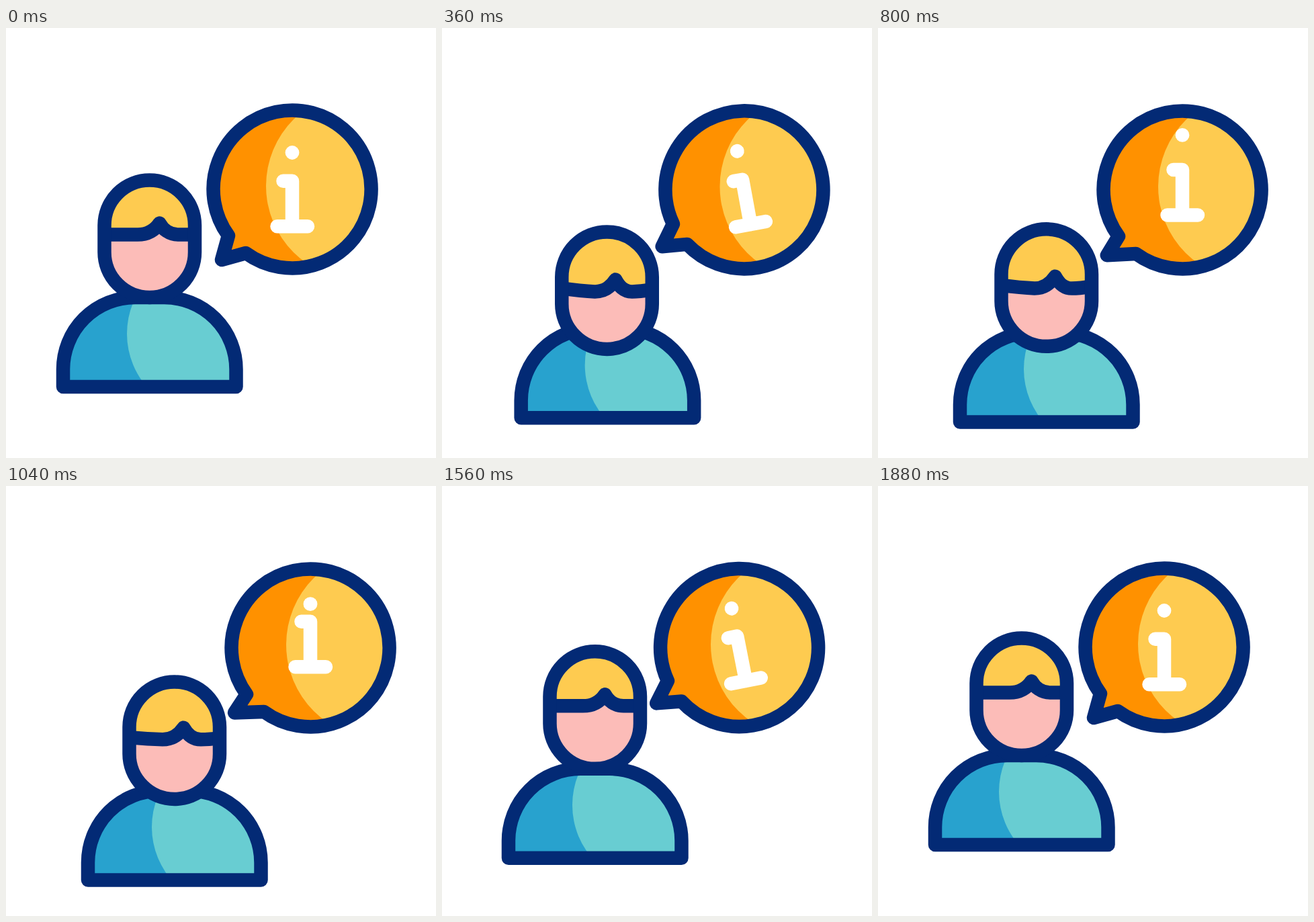
These frames come from a looping animation (640 by 640 pixels, 2 s). An HTML page:

```html
<!DOCTYPE html>
<html lang="en">
<head>
<meta charset="utf-8">
<title>Person with information bubble</title>
<style>
  html, body { margin: 0; width: 100%; height: 100%; overflow: hidden; background: #fff; }
  svg { display: block; width: 100%; height: 100%; }
  .ink { fill: none; stroke: #032a75; stroke-width: 20.5; stroke-linejoin: round; }
  .mark { fill: none; stroke: #fff; stroke-width: 20.5; stroke-linejoin: round; stroke-linecap: round; }
</style>
</head>
<body>
<svg viewBox="0 0 640 640">
  <defs>
    <path id="torso" d="M85 534V508A107 107 0 0 1 192 401H235.5A107 107 0 0 1 342.5 508V534Z"/>
    <rect id="face" x="146.5" y="226.5" width="134.5" height="174.5" rx="67.25"/>
    <path id="balloon"/>
    <clipPath id="inTorso"><use href="#torso"/></clipPath>
    <clipPath id="inFace"><use href="#face"/></clipPath>
    <clipPath id="inBalloon"><use href="#balloon"/></clipPath>
  </defs>

  <g id="body">
    <use href="#torso" fill="#28a2ce"/>
    <g clip-path="url(#inTorso)"><circle cx="301" cy="455" r="121" fill="#68cdd2"/></g>
    <use href="#torso" class="ink"/>
  </g>

  <g id="head">
    <use href="#face" fill="#fcbcb8"/>
    <g clip-path="url(#inFace)">
      <path id="hair" fill="#fecb50"/>
      <path id="fringe" class="ink"/>
    </g>
    <use href="#face" class="ink"/>
  </g>

  <g id="bubble">
    <use href="#balloon" fill="#ff9100"/>
    <g clip-path="url(#inBalloon)"><circle id="shine" cx="527" cy="235" r="140" fill="#fecb50"/></g>
    <use href="#balloon" class="ink"/>
    <g id="info">
      <circle id="dot" cx="426" cy="185.5" r="10.4" fill="#fff"/>
      <path id="stem" class="mark" d="M412.5 227.7H426V295.2M403.5 295.2H449"/>
    </g>
  </g>
</svg>
<script>
const LOOP = 2000, STEP = 40;
const CX = 426, CY = 240, R = 117.5;
const $ = id => document.getElementById(id);
const clamp = u => Math.min(1, Math.max(0, u));
const ease = u => (1 - Math.cos(Math.PI * u)) / 2;
const bell = (t, a, b) => Math.sin(Math.PI * clamp((t - a) / (b - a)));
const hop = (t, a, b) => bell(t, a, b) ** 2;
const move = (id, x, y) => $(id).setAttribute('transform', `translate(${x} ${y})`);

// Eased value through [time, value] keys
function track(t, keys) {
  if (t <= keys[0][0]) return keys[0][1];
  for (let i = 1; i < keys.length; i++) {
    const [a, p] = keys[i - 1], [b, q] = keys[i];
    if (t <= b) return p + (q - p) * ease((t - a) / (b - a));
  }
  return keys[keys.length - 1][1];
}

const BODY = [[80, 0], [440, 1], [1192, 1], [1828, 0]];
const BUBBLE = [[80, 0], [440, 1], [1320, 1], [1880, 0]];
const SHINE = [[80, 0], [440, 3], [1200, 3], [1320, 1], [1560, -3.5], [1880, 0]];
const DIP = [[80, 0], [440, 14], [560, 14], [860, 21], [1270, 0]];
const SAG = [[560, 0], [860, 1], [1270, 0]];
const TIP = [[560, 0], [860, 4.5], [1320, 4.5], [1560, 0]];
const LIFT = [[80, 0], [240, 5], [520, 0], [1220, 0], [1320, 5], [1560, 5], [1840, 0]];

function polar(x, y, deg) {
  const a = Math.atan2(y, x) + deg * Math.PI / 180, r = Math.hypot(x, y);
  return `${CX + r * Math.cos(a)} ${CY + r * Math.sin(a)}`;
}

function balloonPath(turn, tip) {
  const left = polar(-95, 69, turn);
  return `M${left}L${polar(-105, 105, turn + tip)}L${polar(-69, 95, turn)}A${R} ${R} 0 1 0 ${left}Z`;
}

function fringePath(s) {
  const y = 307.5, low = y + 8 * s, px = 228.5 - 2 * s, py = 290.5 + 7 * s, rx = 256 - 5 * s;
  return `M146 ${y + 3 * s}Q175 ${y + 7 * s} 196 ${low}` +
    `C212 ${low} ${px - 6} ${py + 9} ${px} ${py}` +
    `C${px + 5} ${py + 9} ${rx - 13} ${low} ${rx} ${low}` +
    `Q${rx + 12} ${low} 282 ${y + 4.5 * s}`;
}

const hops = (t, start) => hop(t, start, start + 300) + hop(t, start + 300, start + 600);

function draw(t) {
  const swing = bell(t, 80, 520) + bell(t, 1320, 1880);
  const nod = bell(t, 80, 520);
  const walk = track(t, BODY), drift = track(t, BUBBLE);

  move('body', 37 * walk, 52.5 * walk);
  move('head', 37 * walk - nod, 52.5 * walk + track(t, DIP) + 20 * nod);
  const line = fringePath(1.1 * nod + track(t, SAG));
  $('fringe').setAttribute('d', line);
  $('hair').setAttribute('d', line + 'V200H146Z');

  move('bubble', 27 * drift, drift);
  $('balloon').setAttribute('d', balloonPath(11.4 * swing, track(t, TIP)));
  move('shine', track(t, SHINE), 0);

  $('info').setAttribute('transform', `rotate(${-11.4 * swing} ${CX} ${CY})`);
  move('stem', 0, -track(t, LIFT) - 27 * hops(t, 590));
  move('dot', 0, -track(t - 40, LIFT) - 29.5 * hops(t, 678));
}

const start = performance.now();
function tick() {
  const t = (performance.now() - start) % LOOP;
  draw(Math.floor(t / STEP) * STEP);
  requestAnimationFrame(tick);
}
tick();
</script>
</body>
</html>
```
